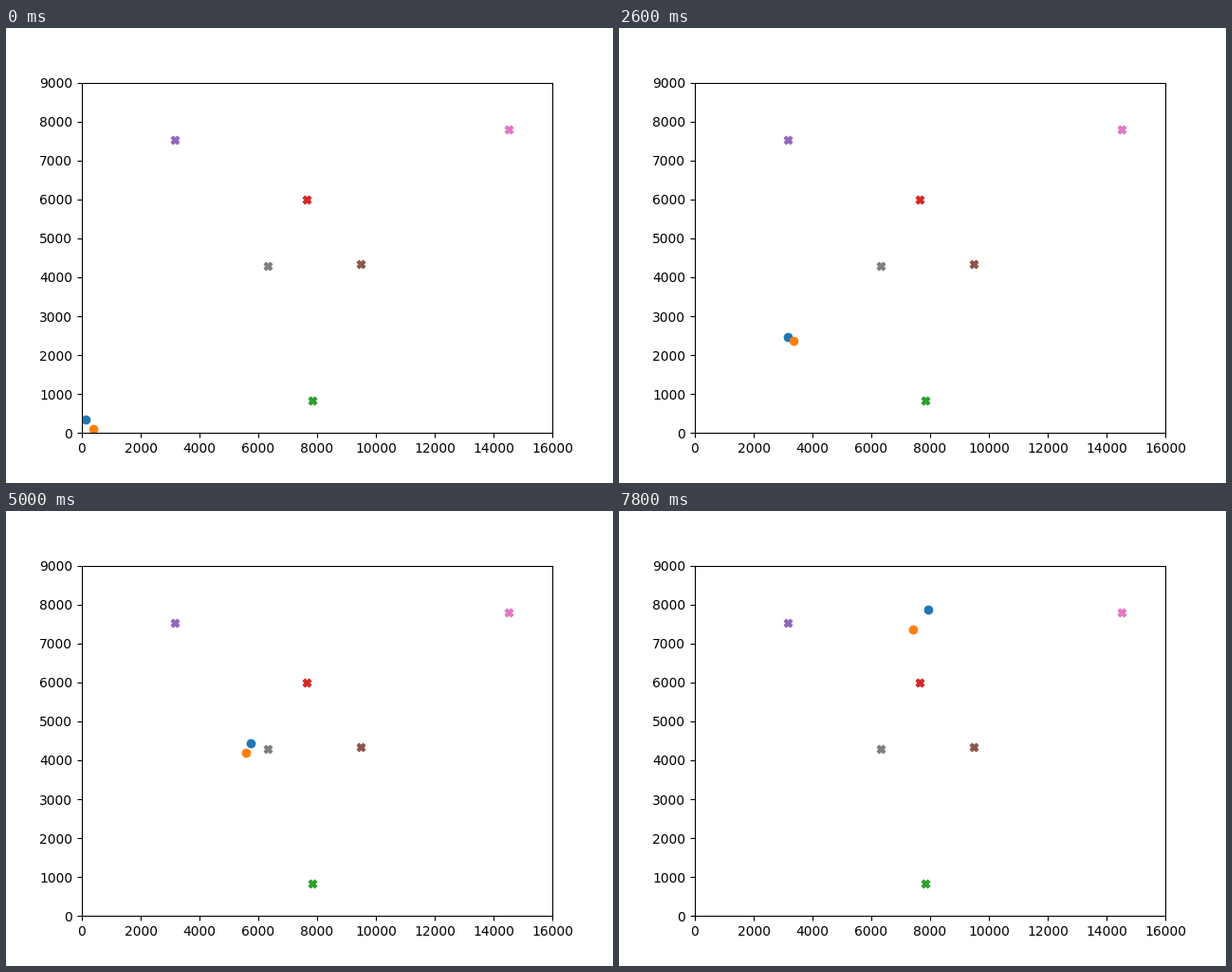
These frames come from a looping animation (640 by 480 pixels, 8000 ms). A matplotlib script:

```python
import math
import matplotlib.pyplot as plt
from matplotlib.animation import FuncAnimation

FRAMES, INTERVAL = 40, 200
LAST = FRAMES - 1
SAG = 130  # sideways bow of the first leg

# Points are complex numbers x + yj; goals take the colours C2 to C7
GOALS = [7840 + 825j, 7660 + 5990j, 3175 + 7525j,
         9485 + 4335j, 14530 + 7795j, 6335 + 4285j]
TURN = GOALS[1]


def runner(start, end, turn_step, lag, slow_step, period):
    """Run to the turn, falling back by lag once a period, then on to end."""
    leg = TURN - start
    heading = leg / abs(leg)

    def position(step):
        u = step / turn_step
        if u < 1:
            back = lag * math.cos(math.pi * (step - slow_step) / period) ** 6
            bow = SAG * math.sin(math.pi * u)
            return start + leg * u - heading * (back + 1j * bow)
        v = (step - turn_step) / (LAST - turn_step)
        return TURN + (end - TURN) * v

    return position


fig, ax = plt.subplots(figsize=(6.4, 4.8), dpi=100)
ax.set_xlim(0, 16000)
ax.set_ylim(0, 9000)

paths = [runner(130 + 345j, 7945 + 7865j, 32.5, 300, 10, 15),
         runner(430 + 150j, 7430 + 7355j, 33, 480, 5, 20)]
dots = [ax.scatter(0, 0, color=f"C{i}") for i in range(len(paths))]
for i, goal in enumerate(GOALS, start=len(dots)):
    ax.scatter(goal.real, goal.imag, marker="X", color=f"C{i}")


def update(step):
    for dot, path in zip(dots, paths):
        p = path(step)
        dot.set_offsets([(p.real, p.imag)])
    return dots


anim = FuncAnimation(fig, update, frames=FRAMES, interval=INTERVAL,
                     repeat=True, repeat_delay=0)
plt.show()
```
